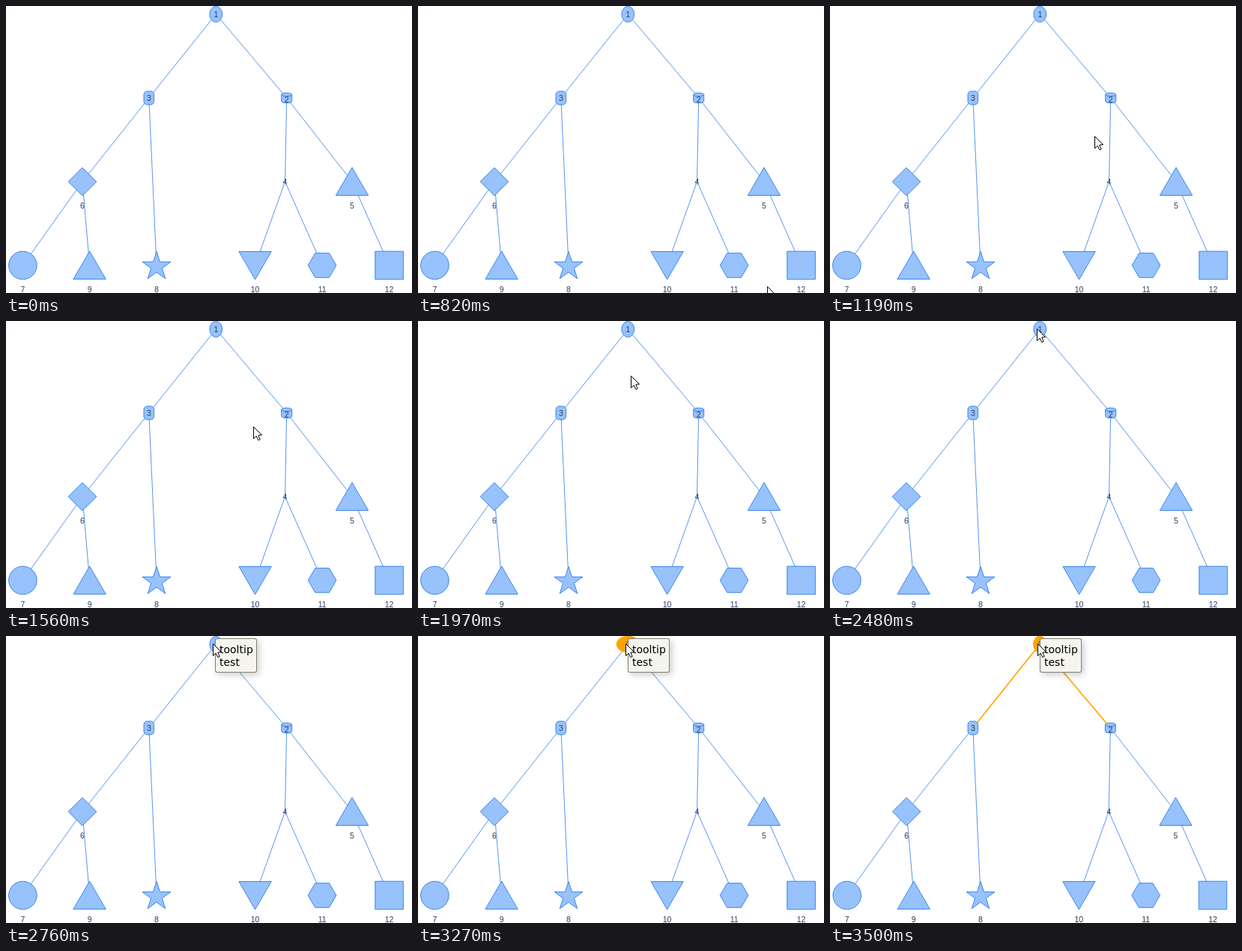
An HTML page with a canvas for the animation above (4.15 s loop, 542 by 384 pixels).

```html
<!DOCTYPE html>
<html>
<head>
<meta charset="utf-8">
<title>Tree with tooltip</title>
<style>
html, body { margin: 0; width: 100%; height: 100%; overflow: hidden; background: #fff; }
canvas { display: block; }
</style>
</head>
<body>
<canvas id="stage" width="542" height="384"></canvas>
<script>
const ctx = document.getElementById('stage').getContext('2d');
const LOOP = 4150, R = 18.8;
const BLUE = '#2b7ce9', FILL = '#97c2fc', ORANGE = '#ffa500';
const SELECT = 3270, SETTLE = 3500;

// id: [x, y, shape, label offset]
const nodes = {
  1: [280.3, 11, 'ellipse', 0],
  2: [374.7, 123, 'database', 2],
  3: [190.8, 123, 'box', 0],
  4: [372.5, 235, 'text', 0],
  5: [462, 235, 'triangle', 32],
  6: [102, 235, 'diamond', 32],
  7: [22.4, 347, 'circle', 32],
  8: [201, 347, 'star', 32],
  9: [111.6, 347, 'triangle', 32],
  10: [332.6, 347, 'triangleDown', 32],
  11: [422.1, 347, 'hexagon', 32],
  12: [511.6, 347, 'square', 32]
};
const edges = [[1, 3], [1, 2], [3, 6], [3, 8], [2, 4], [2, 5],
               [6, 7], [6, 9], [4, 10], [4, 11], [5, 12]];

function poly(points) {
  points.forEach(([x, y], i) => i ? ctx.lineTo(x, y) : ctx.moveTo(x, y));
  ctx.closePath();
}

// Points around a centre; radii alternate between the two values
function ring(x, y, n, outer, inner, turn) {
  poly(Array.from({ length: n }, (_, i) => {
    const a = turn + i * 2 * Math.PI / n, r = i % 2 ? inner : outer;
    return [x + r * Math.sin(a), y - r * Math.cos(a)];
  }));
}

function triangle(x, y, dir) {
  const r = R * 1.15, cy = y + dir * 0.275 * r, inner = r / Math.sqrt(3);
  poly([[x, cy - dir * 2 * inner], [x + r, cy + dir * inner], [x - r, cy + dir * inner]]);
}

const shapes = {
  ellipse: (x, y, rx = 8.4) => ctx.ellipse(x, y, rx, 10.6, 0, 0, 7),
  circle: (x, y) => ctx.arc(x, y, R, 0, 7),
  box: (x, y) => ctx.roundRect(x - 6.8, y - 9, 13.6, 18, 4.5),
  square: (x, y) => ctx.rect(x - R, y - R, 2 * R, 2 * R),
  diamond: (x, y) => ring(x, y, 4, R, R, 0),
  hexagon: (x, y) => ring(x, y, 6, R, R, Math.PI / 6),
  star: (x, y) => ring(x, y + R * 0.082, 10, R * 1.066, R * 0.41, 0),
  triangle: (x, y) => triangle(x, y, 1),
  triangleDown: (x, y) => triangle(x, y, -1),
  database(x, y) {
    ctx.ellipse(x, y - 4.4, 7, 2.3, 0, Math.PI, 2 * Math.PI);
    ctx.ellipse(x, y + 4.6, 7, 2.3, 0, 0, Math.PI);
    ctx.closePath();
    ctx.moveTo(x + 7, y - 4.4);
    ctx.ellipse(x, y - 4.4, 7, 2.3, 0, 0, Math.PI);
  }
};

function drawTree(t) {
  const settled = t >= SETTLE;
  ctx.save();
  if (settled) ctx.transform(0.998, 0, 0, 1, 0.4, 0);

  for (const [a, b] of edges) {
    const hot = settled && a === 1;
    ctx.strokeStyle = hot ? ORANGE : BLUE;
    ctx.lineWidth = hot ? 1.7 : 0.8;
    ctx.beginPath();
    ctx.moveTo(nodes[a][0], nodes[a][1]);
    ctx.lineTo(nodes[b][0], nodes[b][1]);
    ctx.stroke();
  }

  ctx.font = '10.5px "Liberation Sans", Arial, sans-serif';
  ctx.textAlign = 'center';
  for (const id in nodes) {
    const [x, y, shape, drop] = nodes[id];
    const hot = id === '1' && t >= SELECT;
    if (shapes[shape]) {
      ctx.beginPath();
      shapes[shape](x, y, hot && !settled ? 14.8 : undefined);
      ctx.fillStyle = hot ? ORANGE : FILL;
      ctx.strokeStyle = hot ? ORANGE : BLUE;
      ctx.lineWidth = hot ? 1.5 : 0.9;
      ctx.fill();
      ctx.stroke();
    }
    ctx.fillStyle = settled ? '#343434' : '#343c5c';
    ctx.fillText(id, x, y + drop + 3.6);
  }
  ctx.restore();
}

function drawTooltip(x, y) {
  ctx.save();
  ctx.shadowColor = 'rgba(0,0,0,0.2)';
  ctx.shadowBlur = 10;
  ctx.shadowOffsetX = ctx.shadowOffsetY = 3;
  ctx.fillStyle = '#808074';
  ctx.beginPath();
  ctx.roundRect(x, y, 56, 46, 3);
  ctx.fill();
  ctx.restore();
  ctx.fillStyle = '#f5f4ed';
  ctx.beginPath();
  ctx.roundRect(x + 1, y + 1, 54, 44, 2);
  ctx.fill();
  ctx.fillStyle = '#000';
  ctx.font = '14px Verdana, "DejaVu Sans", sans-serif';
  ctx.textAlign = 'left';
  ctx.fillText('tooltip', x + 6, y + 20);
  ctx.fillText('test', x + 6, y + 37);
}

// Pointer moves: [start, end, steps, from, to]
const moves = [
  [820, 1190, 8, [466, 375], [353, 174]],
  [1424, 1700, 6, [353, 174], [284, 75]],
  [1970, 2300, 7, [284, 73], [276, 21]],
  [2300, 2480, 4, [276, 21], [276, 10]],
  [2950, 2950, 1, [276, 10], [277, 10]]
];

function pointerAt(t) {
  const move = moves.filter(m => t >= m[0]).pop();
  if (!move) return null;
  const [start, end, steps, from, to] = move;
  const p = t >= end ? 1 : Math.floor((t - start) / (end - start) * steps + 1e-6) / steps;
  return from.map((v, i) => Math.round(v + (to[i] - v) * p));
}

function drawPointer([x, y]) {
  ctx.save();
  ctx.translate(x + 0.5, y + 0.5);
  ctx.beginPath();
  poly([[0, 0], [0, 16], [3.7, 12.5], [6.3, 18], [8.7, 17], [6.3, 11.5], [11, 11]]);
  ctx.fillStyle = '#fff';
  ctx.strokeStyle = '#000';
  ctx.lineWidth = 1;
  ctx.fill();
  ctx.stroke();
  ctx.restore();
}

function frame() {
  const t = performance.now() % LOOP;
  ctx.fillStyle = '#fff';
  ctx.fillRect(0, 0, 542, 384);
  drawTree(t);
  if (t >= 2760) drawTooltip(t < 2950 ? 279 : 280, 3);
  const pointer = pointerAt(t);
  if (pointer) drawPointer(pointer);
  requestAnimationFrame(frame);
}
frame();
</script>
</body>
</html>
```
